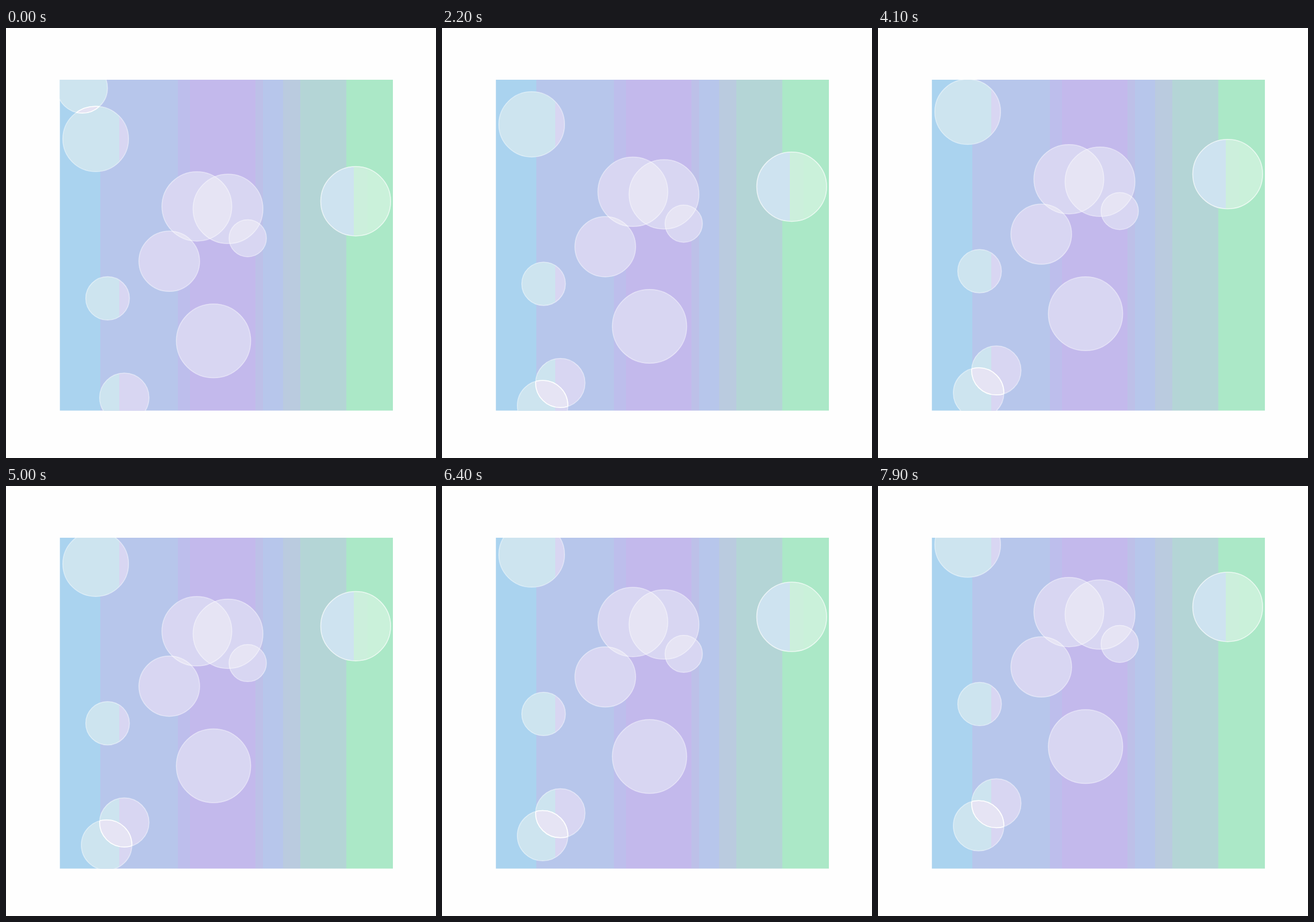
An HTML page with a canvas for the animation above (8000 ms loop, 748x748 px).

```html
<!DOCTYPE html>
<html lang="en">
<head>
<meta charset="utf-8">
<title>Rising bubbles</title>
<style>
  html, body { margin: 0; width: 100%; height: 100%; overflow: hidden; background: #fefefe; }
  canvas { display: block; width: 748px; height: 748px; }
</style>
</head>
<body>
<canvas id="stage" width="748" height="748"></canvas>
<script>
const ctx = document.getElementById('stage').getContext('2d');
const LOOP = 8000, STEP = 100, RISE = 1.152, RESPAWN = 14;
const BOX = { x: 93.5, y: 90, w: 579.7, h: 575.7 };
const SQUASH = 0.993;
const OVERLAP = '#e6e4f4';

// Vertical bands: [left edge, colour]
const BACK = [
  [93, '#aad3ef'], [164, '#b7c6eb'], [299, '#bdbeec'], [320, '#c3b9ec'],
  [434, '#bdc0e8'], [447, '#b7c6eb'], [482, '#bacbdf'], [512, '#b4d5d6'], [592, '#abe8c7']
];
const GLASS = [
  [93, '#cde4ef'], [197, '#d8d6f2'], [500, '#cee3f0'], [605, '#ccefdc'], [629, '#caf1da']
];

const bubble = (x, y, r, edge = 0.45) => ({ x, y, r, edge });
const BUBBLES = [
  bubble(156, 193, 57.2),
  bubble(332, 310.3, 60.8),
  bubble(386.2, 314.7, 60.8),
  bubble(420.5, 365.7, 32.5),
  bubble(284, 405.8, 52.8),
  bubble(176.7, 470.3, 38),
  bubble(361, 544.3, 64.7),
  bubble(205.8, 642.9, 43),
  bubble(608.3, 301.4, 60.8, 0.7)
];

// Hard-edged horizontal gradient across the stage
function banded(bands) {
  const g = ctx.createLinearGradient(0, 0, 748, 0);
  bands.forEach(([x, colour], i) => {
    g.addColorStop(x / 748, colour);
    g.addColorStop(i + 1 < bands.length ? bands[i + 1][0] / 748 : 1, colour);
  });
  return g;
}
const backFill = banded(BACK), glassFill = banded(GLASS);

function trace(b) {
  ctx.beginPath();
  ctx.ellipse(b.x, b.y, b.r, b.r * SQUASH, 0, 0, Math.PI * 2);
}

function fill(b, colour) {
  trace(b);
  ctx.fillStyle = colour;
  ctx.fill();
}

function stroke(b, colour) {
  trace(b);
  ctx.strokeStyle = colour;
  ctx.lineWidth = 1.5;
  ctx.stroke();
}

function within(b, paint) {
  ctx.save();
  trace(b);
  ctx.clip();
  paint();
  ctx.restore();
}

// The topmost bubble leaves at the top and comes back at the bottom
function wrapping(n) {
  return n < RESPAWN
    ? bubble(132.6, 104.4 - n * RISE, 44)
    : bubble(175, 665.9 - (n - RESPAWN) * RISE, 44);
}

function draw(n) {
  const all = BUBBLES.map(b => ({ ...b, y: b.y - n * RISE }));
  all.push(wrapping(n));

  const pairs = [];
  all.forEach((a, i) => all.slice(i + 1).forEach(b => {
    if (Math.hypot(a.x - b.x, a.y - b.y) < a.r + b.r) pairs.push([a, b]);
  }));

  ctx.fillStyle = '#fefefe';
  ctx.fillRect(0, 0, 748, 748);
  ctx.save();
  ctx.beginPath();
  ctx.rect(BOX.x, BOX.y, BOX.w, BOX.h);
  ctx.clip();
  ctx.fillStyle = backFill;
  ctx.fillRect(BOX.x, BOX.y, BOX.w, BOX.h);

  all.forEach(b => fill(b, glassFill));
  pairs.forEach(([a, b]) => within(a, () => fill(b, OVERLAP)));
  all.forEach(b => stroke(b, `rgba(255,255,255,${b.edge})`));

  // Rims shine brighter where the left-hand bubbles cross
  pairs.filter(([a, b]) => Math.max(a.x, b.x) < 250).forEach(([a, b]) => {
    within(a, () => stroke(b, '#fefefe'));
    within(b, () => stroke(a, '#fefefe'));
  });
  ctx.restore();
}

const start = performance.now();
function tick() {
  draw(Math.floor(((performance.now() - start) % LOOP) / STEP));
  requestAnimationFrame(tick);
}
tick();
</script>
</body>
</html>
```
